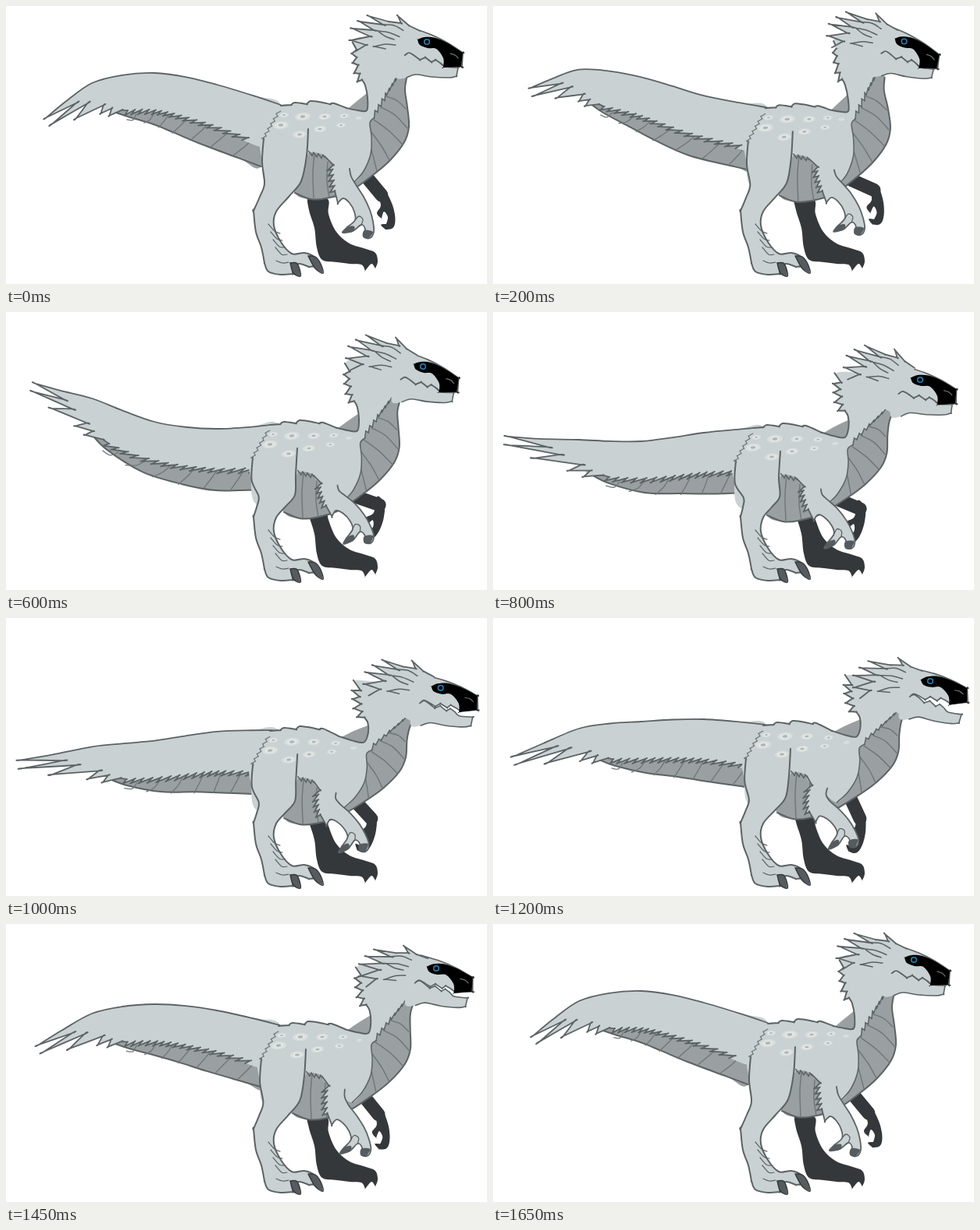
An HTML page with a canvas that plays this animation: 616x357 px, repeating every 1700 ms.

```html
<!DOCTYPE html>
<html lang="en">
<head>
<meta charset="utf-8">
<title>Raptor idle</title>
<style>
html, body { margin: 0; width: 100%; height: 100%; overflow: hidden; background: #fff; }
canvas { display: block; }
</style>
</head>
<body>
<canvas id="stage" width="616" height="357"></canvas>
<script>
const ctx = document.getElementById('stage').getContext('2d');
const LIGHT = '#c9d1d3', GREY = '#9a9fa1', DARK = '#34383b', LINE = '#5c6365', RIB = '#707678';
const STEP = 50, LOOP = 1700;

// Pose keys: body x y | head x y turn | crest turn | jaw | arm x y turn | far hand x y turn | tail heights, tip x y
const TIMES = [0, 400, 600, 800, 1200, 1450, 1650];
const KEYS = [
  [0, 0, 0, 0, 0, 0, 0, 0, 0, 0, 0, 0, 0, 101, 86, 99, 52, 143],
  [-9, 10, -17, 8, 5, 4, 0, -5, 3, -13, 8, -8, 23, 137, 112, 80, 42, 76],
  [-14, 17, -5, 24, 1, 5, 0, -12, 10, -14, -4, 5, 32, 150, 141, 111, 38, 92],
  [-19, 21, 8, 41, -2, 8, 0, -18, 15, -12, -12, 10, 31, 155, 166, 164, 20, 160],
  [-6, 10, 21, 35, -6, -6, 12, -17, 10, -17, -12, 15, 26, 130, 133, 142, 28, 177],
  [-3, 3, 12, 11, -3, -7, 6, -10, 5, -7, -4, 2, 6, 111, 103, 115, 42, 155]
];

const clamp = v => Math.max(0, Math.min(1, v));
const mix = (a, b, w) => a.map((v, i) => v + (b[i] - v) * w);

function slope(i, c) {
  i %= 6;
  const before = TIMES[i || 6] - TIMES[(i || 6) - 1], after = TIMES[i + 1] - TIMES[i];
  const d0 = (KEYS[i][c] - KEYS[(i + 5) % 6][c]) / before;
  const d1 = (KEYS[(i + 1) % 6][c] - KEYS[i][c]) / after;
  return (d0 * after + d1 * before) / (before + after);
}

function poseAt(t) {
  t = Math.min(t, 1650);
  let i = 5;
  while (TIMES[i] > t) i--;
  const h = TIMES[i + 1] - TIMES[i], u = (t - TIMES[i]) / h, v = 1 - u;
  return KEYS[i].map((a, c) => {
    const b = KEYS[(i + 1) % 6][c];
    return a * v * v * (1 + 2 * u) + b * u * u * (3 - 2 * u)
      + h * u * v * (slope(i, c) * v - slope(i + 1, c) * u);
  });
}

// A trailing "!" marks a sharp corner.
const parse = s => s.trim().split(/\s+/).flatMap(q => {
  const p = q.split(',').map(parseFloat);
  return q.endsWith('!') ? [p, p] : [p];
});

function fringe(x1, y1, x2, y2, n, dx, dy) {
  let s = '';
  for (let i = 0; i < n; i++) {
    const x = x1 + (x2 - x1) * i / n, y = y1 + (y2 - y1) * i / n;
    s += ` ${x},${y}! ${x + dx},${y + dy}!`;
  }
  return s + ' ';
}

function trace(p, closed) {
  const n = p.length, at = i => closed ? p[(i + n) % n] : p[Math.max(0, Math.min(n - 1, i))];
  ctx.beginPath();
  ctx.moveTo(...p[0]);
  for (let i = 0; i < (closed ? n : n - 1); i++) {
    const [a, b, c, d] = [at(i - 1), at(i), at(i + 1), at(i + 2)];
    ctx.bezierCurveTo(b[0] + (c[0] - a[0]) / 6, b[1] + (c[1] - a[1]) / 6,
      c[0] - (d[0] - b[0]) / 6, c[1] - (d[1] - b[1]) / 6, ...c);
  }
}
function fill(s, map, color) {
  trace(parse(s).map(map), true);
  ctx.fillStyle = color;
  ctx.fill();
}
function line(s, map, width = 2, color = LINE) {
  trace(parse(s).map(map), false);
  ctx.lineWidth = width;
  ctx.strokeStyle = color;
  ctx.stroke();
}

function turn([x, y], [cx, cy], deg, dx = 0, dy = 0) {
  const a = deg * Math.PI / 180, c = Math.cos(a), s = Math.sin(a);
  x -= cx; y -= cy;
  return [cx + dx + x * c - y * s, cy + dy + x * s + y * c];
}

const TAIL = '0,0 .5,0 1,0 1.5,0 2,0 2.5,0 3,0 3.5,1 4,0! 3.4,11! 3.97,11! 3.25,20! 3.55,26! 2.95,32! 3.12,40! 2.8,39! 2.9,47! 2.6,44!'
  + fringe(2.5, 46, .25, 54, 17, .06, 5);
const TAIL_UNDER = '2.8,43 2.5,54 2,66 1.5,73 1,79 .4,82 0,83';
const CHEST = '513,92 511,108 514,130 516,155 510,175 492,198 470,217 440,238 410,247 390,248 370,240';
const NAPE = '352,128 365,127! 370,124 385,126! 390,122 400,123 415,126! 420,125 436,131! 450,134 462,134 463,118 460,102 456,95! 450,97! 453,87! 446,86! 451,76! 444,73! 449,66! 443,61! 449,56! 444,47!';
const THROAT = fringe(502, 88, 487, 112, 4, -3, 8) + fringe(486, 112, 468, 142, 4, -1, 9) + '466,150 468,168 467,190 458,212 446,226';
const LEG = '330,170 328,200 331,228 325,245 317,263! 320,290 327,310 331,330! 336,341 352,345 367,344! 369,335 376,331 388,335! 396,333 394,322 382,317 366,318 352,303 343,282 346,264 362,245 378,225 385,192 387,158';
const FAR_LEG = '388,245 412,248 413,267 423,290 440,305 461,312 473,317 476,328 473,337! 468,331 460,340! 455,332 440,331 424,329 405,326 398,310 395,285 388,262';
const ARM = '408,193 419,204!' + fringe(412, 211, 416, 246, 5, 6, -1)
  + '425,253! 432,247 440,253 446,264 447,275 437,284! 431,291 444,289 455,281 460,287 458,296 466,298 471,290 470,277 466,262 458,245 449,231 442,219 440,209';
const FAR_HAND = '473,235 486,239 494,253 498,268 498,280 494,286 486,287! 480,281 487,280! 489,271 484,264 481,273! 475,266 480,255';
const SKULL = '520,28 545,37 565,47 585,60! 584,78! 562,78! 556,73 550,69! 545,72! 537,66! 530,69! 522,63 516,60 511,63!';
const JAW = '511,63! 516,60 522,63 530,69! 537,66! 545,72! 550,69! 556,73 562,78 579,79! 577,90! 568,92 545,91 525,88 513,92';
const MASK = '527,43! 536,40 550,41 566,48 585,60! 583,78! 560,79! 560,67 551,55 540,54 530,50';
const CREST = '530,32 516,25! 502,13! 506,22! 490,20! 465,13! 483,24! 453,20! 471,31! 444,29! 466,39! 442,44! 461,50! 448,58!';
const SPOTS = [[380, 142, 10], [352, 153, 10], [408, 142, 8], [376, 165, 9], [402, 158, 8],
  [433, 141, 6], [429, 153, 6], [452, 144, 4], [356, 140, 6]];

function draw(t) {
  const [bx, by, hx, hy, headTurn, crestTurn, jawTurn, ax, ay, armTurn,
    fx, fy, farTurn, y1, y2, y3, tipX, tipY] = poseAt(t);
  const eye = [539, 46];

  const head = p => turn(p, eye, headTurn, hx, hy);
  const crest = p => turn(p, eye, crestTurn, hx, hy);
  const jaw = p => head(turn(p, [511, 63], Math.max(0, jawTurn)));
  const body = ([x, y]) => {
    const pull = y < 135 ? 1 - .7 * (y - 55) / 80 : .3 * (235 - y) / 100;
    return mix([x + bx, y + by], head([x, y]), clamp((x - 420) / 50) * clamp(pull));
  };
  const leg = ([x, y]) => {
    const w = clamp((262 - y) / 65);
    return [x + bx * w, y + by * w];
  };
  const arm = p => mix(body(p), turn(p, [425, 235], armTurn, ax, ay), clamp((p[1] - 195) / 40));
  const farHand = p => turn(p, [482, 245], farTurn, fx, fy);

  const spine = [[352 + bx * .3, 127 + by], [270, y1], [190, y2], [110, y3], [tipX, tipY]];
  const along = s => {
    const i = Math.min(3, Math.floor(s)), u = s - i;
    const [a, b, c, d] = [spine[Math.max(0, i - 1)], spine[i], spine[i + 1], spine[Math.min(4, i + 2)]];
    return [0, 1].map(k => b[k] + u * (c[k] - a[k]) / 2
      + u * u * (a[k] - 2.5 * b[k] + 2 * c[k] - d[k] / 2)
      + u * u * u * (1.5 * (b[k] - c[k]) + (d[k] - a[k]) / 2));
  };
  const tail = ([s, n]) => {
    const p = along(s), a = along(Math.max(0, s - .02)), b = along(Math.min(4, s + .02));
    const dx = b[0] - a[0], dy = b[1] - a[1], len = Math.hypot(dx, dy);
    return [p[0] + n * dy / len, p[1] - n * dx / len];
  };

  ctx.fillStyle = '#fff';
  ctx.fillRect(0, 0, 616, 357);
  ctx.lineCap = ctx.lineJoin = 'round';

  fill(FAR_LEG, leg, DARK);
  ctx.beginPath();
  ctx.moveTo(...body([462, 220]));
  ctx.lineTo(...farHand([481, 243]));
  ctx.lineWidth = 17;
  ctx.strokeStyle = DARK;
  ctx.stroke();
  fill(FAR_HAND, farHand, DARK);

  // Tail
  fill(TAIL_UNDER + ' 0,20 2.6,35', tail, GREY);
  line(TAIL_UNDER, tail);
  for (let s = .3; s < 2.5; s += .34) {
    line(`${s},52 ${s + .08},${66 - s * 3} ${s + .2},${82 - s * s * 4.5}`, tail, 1.3, RIB);
  }
  fill(TAIL + '0,54', tail, LIGHT);
  line(TAIL, tail, 1.8);

  // Chest, neck and torso
  fill(CHEST + ' 360,200 440,130 500,85', body, GREY);
  line(CHEST, body);
  for (const rib of ['487,116 500,121 512,132', '480,130 498,140 514,157', '471,146 490,160 508,178',
    '468,162 481,180 491,198', '468,185 472,200 475,212', '395,190 393,215 394,247', '412,200 411,225 414,246']) {
    line(rib, body, 1.4, RIB);
  }
  fill('335,150 ' + NAPE + ' 455,40 515,45 516,84' + THROAT
    + ' 430,215 412,194 390,188 384,200 372,230 335,230 328,200', body, LIGHT);
  line(NAPE, body);
  line(THROAT, body, 1.5);

  // Near leg
  fill(LEG, leg, LIGHT);
  line(LEG, leg);
  line('331,172' + fringe(328, 170, 350, 132, 6, 5, -3), body, 1.2, RIB);
  line(fringe(388, 187, 412, 193, 4, 4, 5), body, 1.5);
  for (let i = 0; i < 4; i++) line(`${336 + i * 3},${280 + i * 10} ${344 + i * 3},${289 + i * 10} ${351 + i * 3},${292 + i * 9}`, leg, 1.2);
  line('346,327 354,330 362,329', leg, 1.2);
  fill('364,330! 372,330 376,338 377,347! 368,343', leg, '#555b5e');
  fill('387,321! 396,322 403,331 406,343! 396,337', leg, '#555b5e');
  line('364,330 372,330 376,338 377,347 368,343 364,330', leg, 1.4, DARK);
  line('387,321 396,322 403,331 406,343 396,337 387,321', leg, 1.4, DARK);

  for (const [x, y, r] of SPOTS) {
    const [cx, cy] = body([x, y]);
    const oval = (k, color) => {
      ctx.fillStyle = color;
      ctx.beginPath();
      ctx.ellipse(cx, cy, r * k, r * k * .5, -.1, 0, 7);
      ctx.fill();
    };
    oval(1, '#d9dedd');
    if (r > 5) { oval(.65, '#e4e6e4'); oval(.33, '#adb5b6'); }
  }

  // Near arm
  fill(ARM + ' 455,195 425,180', arm, LIGHT);
  line(ARM, arm, 1.8);
  fill('446,283 437,284 431,291! 444,290', arm, '#555b5e');
  fill('459,288 457,296 464,299! 470,290', arm, '#555b5e');
  line('447,275 452,270 457,274 455,281', arm, 1.3);

  // Head
  fill(JAW + ' 500,92 502,70', jaw, LIGHT);
  line(JAW, jaw, 1.6);
  fill(SKULL + ' 511,78 506,88 490,80 472,62 482,34 505,24', head, LIGHT);
  line(SKULL, head, 1.7);
  fill(CREST + ' 478,62 505,55 520,40', crest, LIGHT);
  line(CREST, crest, 1.8);
  for (const feather of ['503,39! 490,34 476,32! 486,39 497,43', '498,50! 486,49 472,52! 486,55', '508,31! 497,25 484,24!']) {
    line(feather, crest, 1.5);
  }
  fill(MASK, head, '#000');
  line('569,61 575,63 579,67', head, 1.2, '#777');
  ctx.beginPath();
  ctx.arc(...head(eye), 3.3, 0, 7);
  ctx.lineWidth = 1.6;
  ctx.strokeStyle = '#1f86b8';
  ctx.stroke();
}

function frame() {
  draw(Math.floor(performance.now() % LOOP / STEP) * STEP);
  requestAnimationFrame(frame);
}
frame();
</script>
</body>
</html>
```
